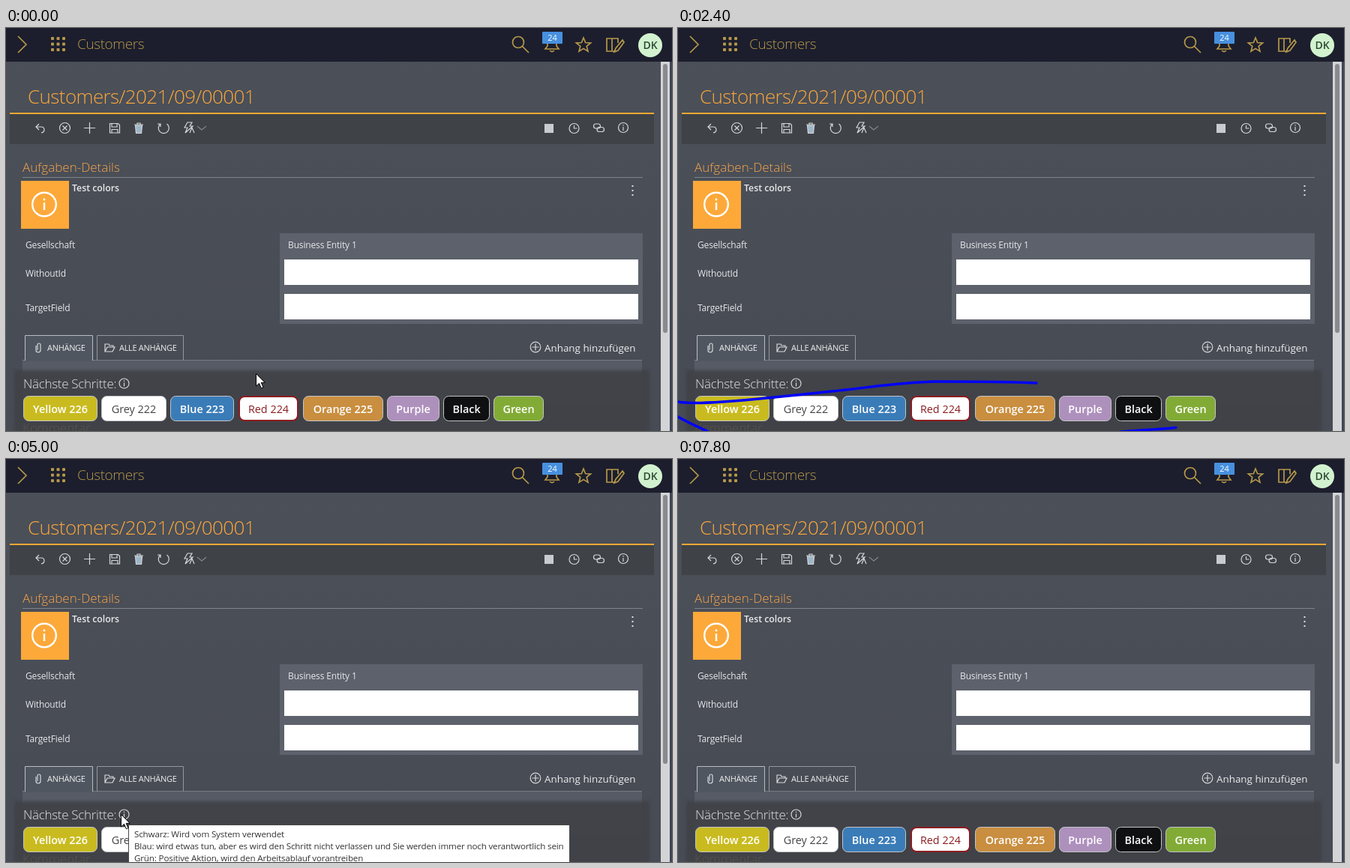
An HTML page that plays this animation: 888 px wide and 538 px high, repeating every 8000 ms.

```html
<!DOCTYPE html>
<html lang="de">
<head>
<meta charset="utf-8">
<style>
  html, body { margin: 0; width: 100%; height: 100%; overflow: hidden; background: #494d56; }
  svg { display: block; font-family: "Open Sans", "Noto Sans", sans-serif; }
  .light { font-weight: 300; }
  .small { font-size: 12px; letter-spacing: -.15px; fill: #e6e7e9; }
  .tab { font-size: 11px; letter-spacing: -.3px; fill: #eceded; }
  .line { fill: none; stroke: #d5d7da; stroke-width: 1.2; }
  .gold { fill: none; stroke: #b5984a; stroke-width: 1.7; }
  .ink { fill: none; stroke: #0000fa; stroke-width: 3.4; stroke-linecap: round; }
  .tip { font-size: 11.6px; letter-spacing: -.15px; fill: #333; }
</style>
</head>
<body>
<svg width="888" height="538" viewBox="0 0 888 538">
  <defs>
    <linearGradient id="page" x2="0" y2="1"><stop stop-color="#4b5059"/><stop offset="1" stop-color="#474b54"/></linearGradient>
    <filter id="soft" x="-5%" y="-20%" width="110%" height="140%"><feGaussianBlur stdDeviation="2"/></filter>
    <g id="info" class="line"><circle r="6.5"/><path d="M0-1V4M0-4V-2.6"/></g>
  </defs>
  <rect width="888" height="538" fill="url(#page)"/>

  <!-- App bar -->
  <rect width="888" height="45" fill="#1c1e2d"/>
  <path class="gold" stroke-width="2" d="M16 11 27 22 16 33"/>
  <g id="dots" fill="#b5984a"></g>
  <text class="light" x="95" y="28" font-size="19" letter-spacing="-.4" fill="#b5984a">Customers</text>
  <g class="gold">
    <circle cx="683" cy="19" r="7.5"/><path d="M688.500 24.500 697 33"/>
    <path d="M719 28h18l-3-4V17h-12v7zM725 30q3 3 6 0"/>
    <path d="M770 13l2.600 6.500 7 .4-5.400 4.500 1.800 6.800-6-3.800-6 3.800 1.800-6.800-5.400-4.500 7-.4z"/>
    <path d="M801 14h7v17h-7zM808 14h8v6M808 31h3M822 16l-9 11-2 5 5-2 8-11z"/>
  </g>
  <rect x="715" y="5" width="27" height="16" rx="1" fill="#4790df"/>
  <text x="728.500" y="17" font-size="11" text-anchor="middle" fill="#fff">24</text>
  <circle cx="859" cy="23" r="16" fill="#d2f2cf"/>
  <text x="859" y="28" font-size="14" font-weight="600" text-anchor="middle" fill="#2d4a35">DK</text>

  <!-- Scrollbar -->
  <rect x="873" y="45" width="12" height="493" fill="#d3d4d6"/>
  <rect x="876" y="48" width="6" height="359" rx="3" fill="#888a8e"/>
  <rect x="885" y="45" width="3" height="493" fill="#3f4552"/>

  <!-- Title and toolbar -->
  <text class="light" x="29" y="101" font-size="26" letter-spacing="-.6" fill="#f9a63a">Customers/2021/09/00001</text>
  <rect x="5" y="115" width="859" height="40" fill="#3f4347"/>
  <rect x="5" y="113" width="859" height="2" fill="#fba834"/>
  <g class="line">
    <path d="M44 128l-4 4 4 4M40 132h7q4 0 4 4 0 3-4 4"/>
    <circle cx="78.500" cy="133.500" r="7"/><path d="M75.500 130.500l6 6m0-6l-6 6"/>
    <path d="M104 133.500h15M111.500 126v15"/>
    <path d="M138.500 127.500h11l2 2v10.500h-13zM141 127.500v4.500h7v-4.500M141 140v-4.500h8v4.500"/>
    <path d="M171 129h12M175 129v-2h4v2"/><path d="M172.500 130h9l-1 10.500h-7z" fill="#9fb6c9"/>
    <path d="M206 128a7 7 0 1 0 8.500 0M206 132v-4h-4"/>
    <path d="M242 126h6l-3 5h4l-10 9 3-7h-4zM245 140l3-7 3 7"/>
    <path d="M255 131l6 5 6-5" stroke="#85888c"/>
    <circle cx="757.500" cy="134" r="6.500"/><path d="M757.500 130v4h4"/>
    <rect x="783.500" y="128" width="9" height="6" rx="3"/><rect x="788" y="132.500" width="9.500" height="6" rx="3"/>
  </g>
  <rect x="718" y="128" width="12" height="12" fill="#c9cbce"/>
  <use href="#info" x="823" y="133"/>

  <!-- Details -->
  <text class="light" x="22" y="192" font-size="17" fill="#f9a64a">Aufgaben-Details</text>
  <path d="M22 199.500H849" stroke="#7f838a"/>
  <rect x="20" y="204" width="64" height="64" fill="#fca93a"/>
  <g fill="none" stroke="#fff" stroke-width="2.400"><circle cx="51" cy="235.500" r="15.800"/><path d="M51 233v10M51 227.500v2.800"/></g>
  <text x="88" y="218" font-size="12.300" font-weight="600" fill="#e9eaeb">Test colors</text>
  <path d="M835.500 210v2m0 4v2m0 4v2" stroke="#dfe0e2" stroke-width="2"/>
  <rect x="365" y="274" width="484" height="121" fill="#5c616b"/>
  <path d="M371 309h472v34H371zM371 355h472v34H371z" fill="#fff"/>
  <text class="small" x="26" y="294">Gesellschaft</text>
  <text class="small" x="26" y="332">WithoutId</text>
  <text class="small" x="26" y="378">TargetField</text>
  <text class="small" x="376" y="294" letter-spacing="0">Business Entity 1</text>

  <!-- Attachments -->
  <rect x="22" y="444" width="826" height="58" fill="#565b65"/>
  <path d="M22 443.500H848" stroke="#777b83"/>
  <rect x="25.500" y="410.500" width="90" height="34" fill="#505660"/>
  <path d="M25.500 444V410.500H115.500V444" fill="none" stroke="#b9bcc0"/>
  <path d="M121.500 443.500V410.500H236.500V443.500" fill="none" stroke="#94979d"/>
  <path class="line" d="M40 424v6q0 3 3 3t3-3v-7q0-2-2-2t-2 2v7M132 432v-10h5l1 2h5v2M132 432l3-6h10l-3 6z"/>
  <text class="tab" x="55" y="431">ANHÄNGE</text>
  <text class="tab" x="151" y="431">ALLE ANHÄNGE</text>
  <g class="line"><circle cx="706" cy="426" r="6.800"/><path d="M701.500 426h9M706 421.500v9"/></g>
  <text x="718" y="432" font-size="13.400" fill="#eceded">Anhang hinzufügen</text>

  <!-- Next steps -->
  <rect x="11" y="457" width="847" height="90" fill="#404346" opacity=".93" filter="url(#soft)"/>
  <text class="light" x="22" y="540" font-size="17" fill="#5b534c">Kommentar</text>
  <text class="light" x="23" y="481" font-size="17" letter-spacing="-.3" fill="#e4e5e6">Nächste Schritte:</text>
  <use href="#info" x="157.500" y="474.500"/>
  <g id="buttons" font-size="14.400" text-anchor="middle"></g>

  <g class="ink">
    <path id="left" pathLength="1" d="M478 474C440 472 390 472 345 472 290 473 250 481 205 485 150 491 100 496 60 499 30 501 10 501 0 499-14 503-10 514 0 519 12 526 25 532 45 541"/>
    <path id="right" pathLength="1" d="M590 539C620 536 645 536 663 533.500 700 528 748 525 748 510 748 488 640 480 540 478 470 477 410 478 350 478"/>
  </g>
  <g id="pen"><circle r="4" fill="#d01c2c"/><path d="M-3-2 3 2M-3 2 3-2" stroke="#401030"/></g>
  <g id="tooltip">
    <rect x="163.500" y="488.500" width="588" height="60" fill="#fff" stroke="#4a4a4a"/>
    <text class="tip" x="171" y="505">Schwarz: Wird vom System verwendet</text>
    <text class="tip" x="171" y="521">Blau: wird etwas tun, aber es wird den Schritt nicht verlassen und Sie werden immer noch verantwortlich sein</text>
    <text class="tip" x="171" y="537">Grün: Positive Aktion, wird den Arbeitsablauf vorantreiben</text>
  </g>
  <path id="cursor" d="M.5 .5V17l4-3.700 2.800 6.500 2.700-1.200-2.800-6.200h5z" fill="#fff" stroke="#000"/>
</svg>
<script>
const $ = id => document.getElementById(id);

const steps = [
  ["Yellow 226", 23, 99, "#c9bb1f"],
  ["Grey 222", 127, 87, "#fff", "#444"],
  ["Blue 223", 219, 85, "#3a7cb8"],
  ["Red 224", 310, 80, "#fff", "#8c1c20"],
  ["Orange 225", 396, 107, "#c98e3f"],
  ["Purple", 508, 70, "#ae90bd"],
  ["Black", 583, 62, "#0f1012"],
  ["Green", 650, 67, "#82ab36"]
];
$("buttons").innerHTML = steps.map(([label, x, w, fill, ink = "#fff"]) => {
  const red = label.startsWith("Red");
  const inset = red ? 1 : .5;
  return `<rect x="${x + inset}" y="${491 + inset}" width="${w - 2 * inset}" height="${34 - 2 * inset}" rx="7"
    fill="${fill}" stroke="${red ? ink : "#c4c5c8"}" stroke-width="${2 * inset}"/>
    <text x="${x + w / 2}" y="514" fill="${ink}" font-weight="${ink === "#fff" ? 600 : 400}">${label}</text>`;
}).join("");

for (let i = 0; i < 9; i++) {
  $("dots").innerHTML += `<rect x="${60 + i % 3 * 7.5}" y="${12 + (i / 3 | 0) * 7.5}" width="4" height="4" rx="1"/>`;
}

// Each entry: start time, then the value held until the next entry
const cursorPath = [
  [0, 333, 461], [200, 352, 462], [400, 396, 466], [600, 448, 471], [800, 479, 474], [1000],
  [3600, 345, 478], [3800, 300, 482], [4000, 240, 484], [4200, 190, 480], [4400, 160, 476],
  [4600, 153, 474], [6000, 153, 473], [6800, 151, 473], [7000, 149, 473],
  [7400, 152, 452], [7600, 147, 414], [7800]
];
const penPath = [[0], [1000, 479, 475], [1200, 147, 491], [1400]];
const leftInk = [[0], [1000, .018], [1200, .61], [1400, .86], [1600, .92], [1800, 1], [3600]];
const rightInk = [[0], [2400, .13], [2600, .32], [2800, .5], [3000, .68], [3200, .85], [3400, 1], [3600]];

const at = (track, t) => track.findLast(([start]) => start <= t).slice(1);
const show = (el, on) => el.style.display = on ? "" : "none";

function place(el, [x, y]) {
  show(el, x !== undefined);
  if (x !== undefined) el.setAttribute("transform", `translate(${x} ${y})`);
}

function draw(el, [part]) {
  show(el, part);
  if (part) el.setAttribute("stroke-dasharray", `${part} 2`);
}

function render(now) {
  const t = now % 8000;
  place($("cursor"), at(cursorPath, t));
  place($("pen"), at(penPath, t));
  draw($("left"), at(leftInk, t));
  draw($("right"), at(rightInk, t));
  show($("tooltip"), t >= 5000 && t < 7400);
  requestAnimationFrame(() => render(performance.now()));
}
render(0);
</script>
</body>
</html>
```
